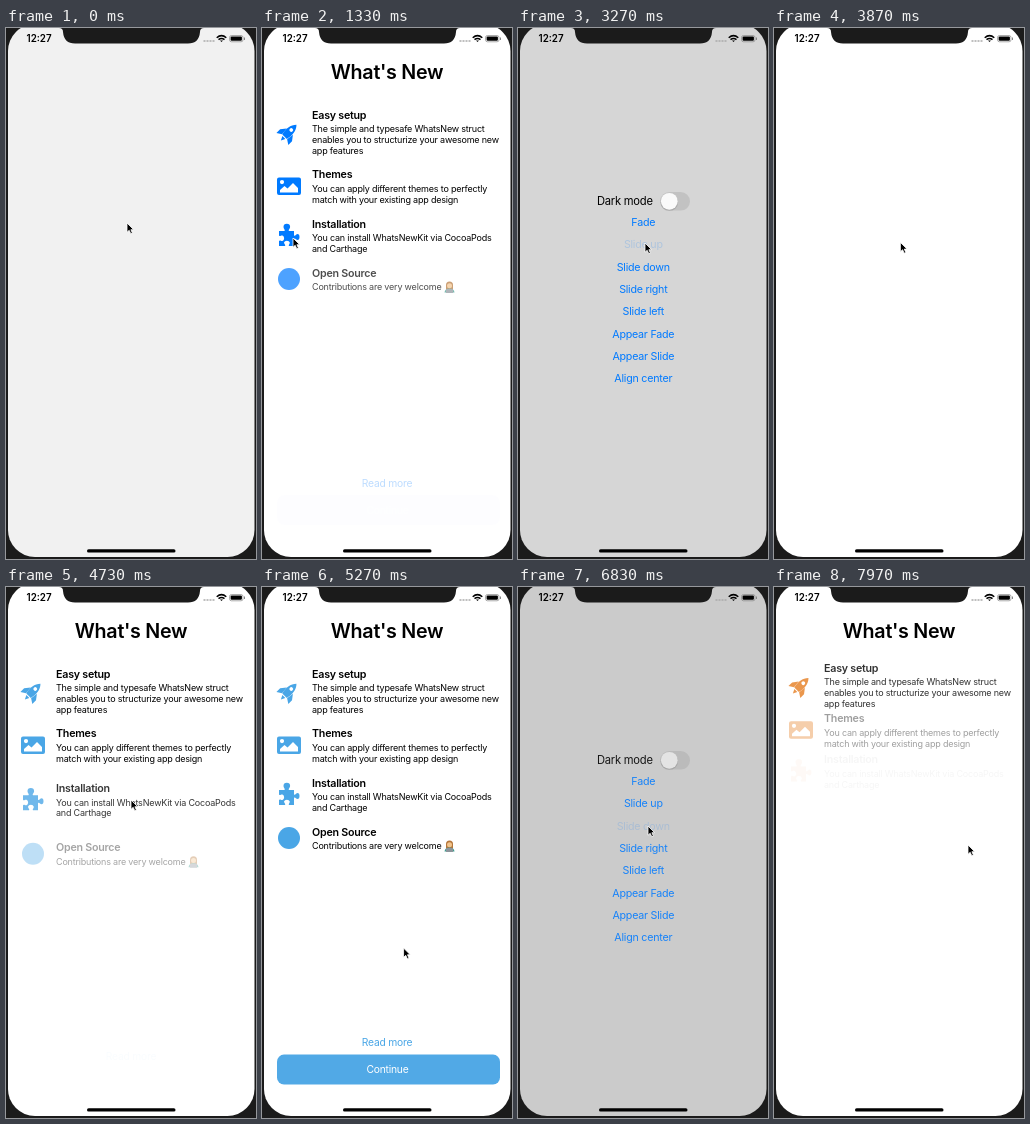
An HTML page that plays this animation: 250x531 px, repeating every 8000 ms.

```html
<!DOCTYPE html>
<html lang="en">
<head>
<meta charset="utf-8">
<style>
  html, body { margin: 0; width: 100%; height: 100%; overflow: hidden; background: #1b1b1b; }
  svg { display: block; width: 250px; height: 531px; }
  text { font-family: Inter, sans-serif; letter-spacing: -.022em; white-space: pre; }
  .mid { text-anchor: middle; }
  .title { font-size: 19.7px; font-weight: 600; letter-spacing: -.015em; }
  .head { font-size: 10.7px; font-weight: 600; }
  .body { font-size: 9px; }
  .link { font-size: 10.7px; fill: #007aff; }
  .small { font-size: 10.3px; }
  .icon { fill: currentColor; fill-rule: evenodd; }
</style>
</head>
<body>
<svg viewBox="0 0 250 531">
  <rect width="250" height="531" fill="#1b1b1b"/>
  <rect id="screen" x="2" y="-4" width="246.5" height="533" rx="27"/>

  <g id="menu">
    <text x="79" y="177.3" font-size="11.2">Dark mode</text>
    <rect x="142" y="164" width="30" height="18.6" rx="9.3" opacity=".09"/>
    <circle cx="151.3" cy="174.2" r="8.8" opacity=".12"/>
    <circle id="knob" cx="151.3" cy="173.3" r="8.4"/>
  </g>

  <g id="modal">
    <g class="part"><text class="title mid" x="125" y="51">What's New</text></g>
    <g class="part">
      <g class="icon" transform="translate(26.3 105) rotate(45) scale(1.05)">
        <path d="M0-11C4-7 4.7-1 3 5H-3C-4.7-1-4-7 0-11ZM0-5.8A1.8 1.8 0 0 0 0-2.2A1.8 1.8 0 0 0 0-5.8Z"/>
        <path d="M-4.2-2L-8 3V8L-3.4 5ZM4.2-2L8 3V8L3.4 5ZM-2 6H2L0 10Z"/>
      </g>
    </g>
    <g class="part">
      <path class="icon" d="M17 149.5H37Q39 149.5 39 151.5V165Q39 167 37 167H17Q15 167 15 165V151.5Q15 149.5 17 149.5ZM20 152A2.1 2.1 0 0 0 20 156.2A2.1 2.1 0 0 0 20 152ZM18 164.5H36V160L31 155L25.5 160.5L22.5 158L18 162Z"/>
    </g>
    <g class="part">
      <path class="icon" d="M17 203H22.5C23.5 202 21.5 201 21.5 198.8A3.3 3.1 0 0 1 28.1 198.8C28.1 201 26 202 27 203H32V207.5C33 208.8 34 206 35.5 206A2 3 0 0 1 35.5 212C34 212 33 209.5 32 211V218H27C26 217 28 216 27.8 214.5A3 2.5 0 0 0 22 214.5C22 216 24 217 23 218H17V213C18 211.5 19 213.5 20.5 213A2 2.8 0 0 0 20.5 207.5C19 207 18 209 17 207.5Z"/>
    </g>
    <g class="part">
      <circle class="icon" cx="27" cy="251" r="11"/>
      <path fill="#b5763a" d="M184 262V257Q184 253.5 187.5 253.5T191 257V262Z"/>
      <path fill="#3d9c8c" d="M182.5 264.5Q183 260.5 187.5 260.5T192.500 264.5Z"/>
      <circle cx="187.5" cy="257.8" r="2.5" fill="#f3c48c"/>
      <rect x="184" y="261" width="7" height="4" rx=".6" fill="#8d949b"/>
    </g>
    <g class="part"><text class="icon small mid" x="125" y="458.700">Read more</text></g>
    <g class="part">
      <g id="continue">
        <rect class="icon" x="15" y="467" width="223" height="30" rx="7"/>
        <text class="small mid" x="125.500" y="485.700" fill="#fff">Continue</text>
      </g>
    </g>
  </g>

  <path fill="#1b1b1b" d="M53 0Q57 0 57 4Q58 15.500 69 15.500H182Q193 15.500 194 4Q194 0 198 0Z"/>
  <text x="20.500" y="14" font-size="9.8" font-weight="600" style="letter-spacing:0">12:27</text>
  <path d="M197.500 13H209" stroke="#aaa" stroke-width="1.600" stroke-dasharray="2 1"/>
  <g fill="none" stroke="#000" stroke-width="1.500">
    <path d="M210.700 9.700Q215.500 5.500 220.300 9.700M212.500 11.700Q215.500 9.200 218.500 11.700"/>
    <path d="M214 12.500H217L215.500 14Z" fill="#000" stroke="none"/>
    <rect x="223.500" y="7.500" width="13.500" height="6.300" rx="2" stroke="#888" stroke-width=".7"/>
    <rect x="224.600" y="8.500" width="11.300" height="4.300" rx="1" fill="#000" stroke="none"/>
    <path d="M238.500 9.500V12" stroke="#888" stroke-width="1"/>
  </g>
  <rect x="81" y="521.300" width="88.500" height="3.200" rx="1.600"/>
  <path id="cursor" d="M0 0V9.300L2.200 7.300L3.800 10.800L5.400 10.100L3.900 6.700H6.700Z" stroke="#fff" stroke-width=".8"/>
</svg>
<script>
const LOOP = 8000, FADE = 330;
const $ = id => document.getElementById(id);
const clamp = v => Math.min(1, Math.max(0, v));

function add(parent, cls, x, y, content) {
  const el = document.createElementNS('http://www.w3.org/2000/svg', 'text');
  el.setAttribute('class', cls);
  el.setAttribute('x', x);
  el.setAttribute('y', y);
  el.textContent = content;
  parent.append(el);
  return el;
}

const parts = [...document.querySelectorAll('.part')];
const items = [
  [90.5, 'Easy setup', 'The simple and typesafe WhatsNew struct', 'enables you to structurize your awesome new', 'app features'],
  [150.3, 'Themes', 'You can apply different themes to perfectly', 'match with your existing app design'],
  [199.5, 'Installation', 'You can install WhatsNewKit via CocoaPods', 'and Carthage'],
  [248.5, 'Open Source', 'Contributions are very welcome'],
];
items.forEach(([y, head, ...lines], i) => {
  add(parts[i + 1], 'head', 50, y, head);
  lines.forEach((line, n) => add(parts[i + 1], 'body', 50, y + 13.8 + n * 10.8, line));
});

const links = ['Fade', 'Slide up', 'Slide down', 'Slide right', 'Slide left', 'Appear Fade', 'Appear Slide', 'Align center']
  .map((label, i) => add($('menu'), 'link mid', 125.3, 198 + i * 22.3, label));

// dir: 0 fades in place, 1 slides up, -1 slides down
const sessions = [
  { open: -310, close: 2270, color: '#007aff', dir: 0 },
  { open: 3205, close: 5810, color: '#4aa6e6', dir: 1 },
  { open: 6738, close: Infinity, color: '#e67e22', dir: -1 },
];
const partStart = [740, 875, 1025, 1175, 1325, 1475, 1625];
const partShift = [15, 30, 24.5, 24.5, 24.5, 15, 15];

// time, x, y
const cursorPath = [
  [0, 121, 195], [300, 121, 195], [1050, 31, 210], [1450, 31, 210], [2050, 140, 481], [2400, 142, 481],
  [3000, 127, 215], [3400, 127, 215], [4700, 125, 213], [4950, 125, 213], [5550, 155, 481], [5950, 155, 481],
  [6550, 130, 239], [6950, 130, 239], [7350, 194, 258], [8000, 194, 258],
];

const sessionAt = t => sessions.filter(s => s.open <= t).pop();
const modalAlpha = t => {
  const s = sessionAt(t);
  return clamp((t - s.open) / FADE) * (1 - clamp((t - s.close) / FADE));
};
// Two white views dissolving over black dip to 75 % brightness.
const grey = t => {
  const a = modalAlpha(t), v = Math.round(255 * (1 - a * (1 - a)));
  return `rgb(${v},${v},${v})`;
};
const visible = a => clamp(1.35 * a - .08);
const smooth = p => p * p * (3 - 2 * p);

function cursorAt(t) {
  const i = cursorPath.findIndex(p => p[0] > t);
  const [t0, x0, y0] = cursorPath[i - 1], [t1, x1, y1] = cursorPath[i];
  const k = smooth((t - t0) / (t1 - t0));
  return [x0 + (x1 - x0) * k, y0 + (y1 - y0) * k];
}

function draw(t) {
  const s = sessionAt(t), a = modalAlpha(t);
  $('screen').setAttribute('fill', grey(t));
  $('knob').setAttribute('fill', grey(t - 60));
  $('menu').setAttribute('opacity', visible(1 - a));
  $('modal').setAttribute('opacity', visible(a));
  $('modal').setAttribute('color', s.color);

  parts.forEach((part, i) => {
    const k = smooth(clamp((t - s.open - partStart[i]) / 500));
    part.setAttribute('opacity', k);
    part.setAttribute('transform', `translate(0 ${s.dir * partShift[i] * (1 - k)})`);
  });
  $('continue').setAttribute('opacity', t > s.close - 80 ? .35 : 1);
  links.forEach((link, i) => {
    const tap = sessions[i];
    const pressed = tap && t > tap.open - 90 && t < tap.open + FADE;
    link.setAttribute('opacity', pressed ? .18 : 1);
  });
  $('cursor').setAttribute('transform', `translate(${cursorAt(t)})`);
}

const begin = performance.now();
function tick() {
  draw((performance.now() - begin) % LOOP);
  requestAnimationFrame(tick);
}
tick();
</script>
</body>
</html>
```
